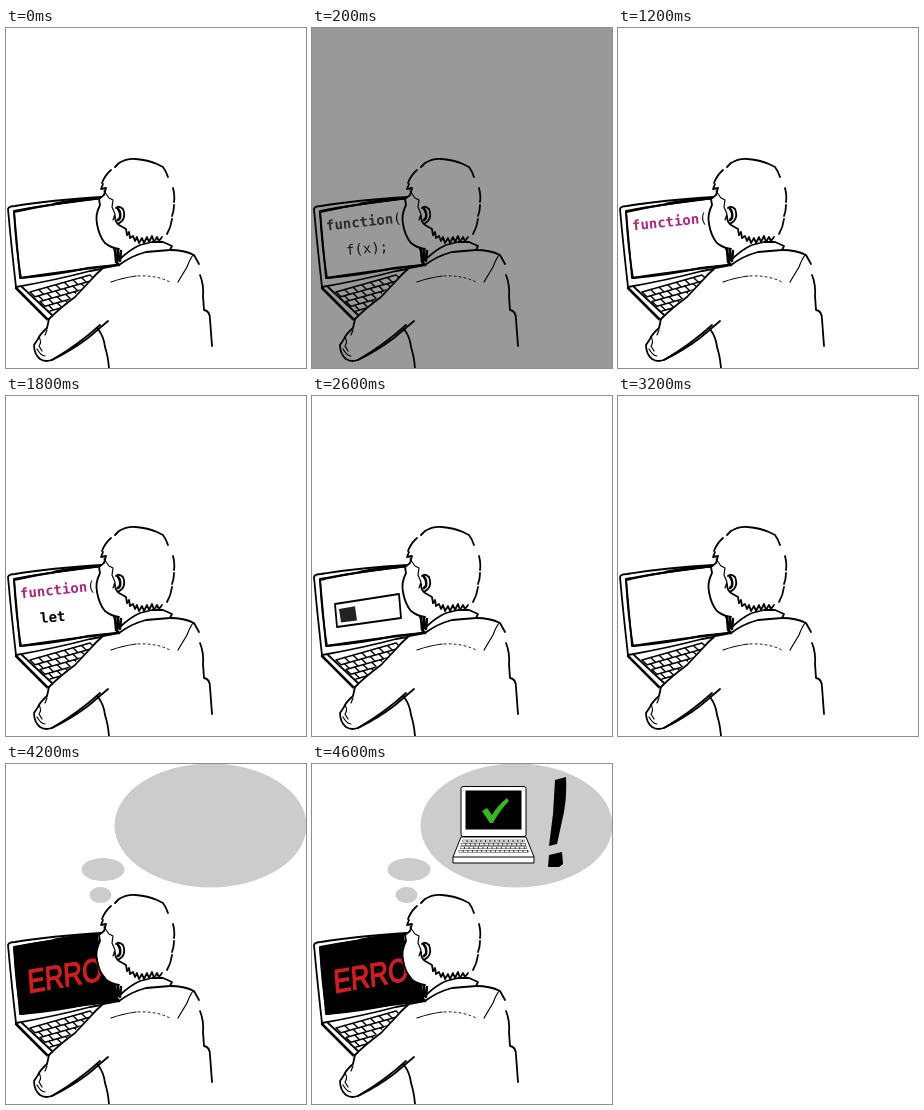
Recreate the animation shown at these times as an HTML page. Size 300 px wide and 340 px high, loop 4.8 s.

```html
<!DOCTYPE html>
<html lang="en">
<head>
<meta charset="utf-8">
<title>Coding, error, idea</title>
<style>
html, body { margin: 0; width: 100%; height: 100%; overflow: hidden; background: #fff; }
svg { display: block; width: 300px; height: 340px; background: #fff; }
.dim { filter: grayscale(1) brightness(.6); }
.ink { fill: none; stroke: #000; stroke-width: 1.8; stroke-linecap: round; stroke-linejoin: round; }
.thin { stroke-width: 1.2; }
.bold { stroke-width: 2.5; }
.code { font: 14px "DejaVu Sans Mono", monospace; fill: #222; white-space: pre; }
.kw { font-weight: bold; fill: #000; }
.fn { font-weight: bold; fill: #a8287f; }
.var { fill: #2020e0; }
.error { font: 30px "Liberation Sans", Arial, sans-serif; fill: #cc1f24; stroke: #cc1f24; stroke-width: 1.3; }
</style>
</head>
<body>
<svg id="stage" viewBox="0 0 300 340">
  <g id="laptop" class="ink">
    <path id="screen" d="M8 183Q45 176 96 170L112 237Q60 243 14 250Z" fill="#fff"/>
    <path d="M10 259Q5 215 2 181Q3 178 9 178Q45 172 96 169"/>
    <path d="M8 184Q30 179 50 176L96 170"/>
    <path d="M48 176Q65 172 94 170" class="bold"/>
    <path d="M8 184Q10 220 15 250Q50 247 82 240L110 237"/>
    <path d="M10 259Q50 252 84 243L112 238"/>
    <path d="M10 260L42 292" class="bold"/>
    <path d="M16 259L46 287"/>
    <g id="keys" stroke-width="1.4"></g>
  </g>
  <g id="code" class="code">
    <text transform="translate(14.5 202.5) rotate(-6)"><tspan class="fn">function</tspan>(</text>
    <text id="line" transform="translate(34.5 227) rotate(-5)"></text>
  </g>
  <g id="progress">
    <path class="ink" d="M23 208L87 198L89 222L25 231Z"/>
    <path id="bar" fill="#222"/>
  </g>
  <text id="error" class="error" transform="matrix(.86 -.15 .08 1.08 22.5 229)">ERRO</text>

  <g id="man">
    <path fill="#fff" d="M97 156L110 137Q130 127 152 136Q168 145 168 165Q168 190 163 204L156 214L165 222L187 226L195 247L199 283L206 318V340H103L95 303L48 332L36 334L28 322L42 291L84 253L97 240L113 237L112 221L103 218L94 206L90 190L93 178L92 172L98 167Z"/>
    <g class="ink">
      <path d="M96 155Q99 147 105 142M109 139L113 135Q121 130 130 131Q142 132 151 136L157 139Q160 143 162 149M167 160Q169 168 168 174M168 177Q168 183 166 188M166 191Q165 199 161 206"/>
      <path d="M97 156L95 161L100 160L98 167L93 171L94 177Q89 187 91 196Q93 208 99 215Q105 220 113 221"/>
      <path d="M98 163L103 170L107 172L106 179L109 186L107 192" class="thin"/>
      <path d="M110 180Q113 177 117 181Q120 188 116 193L112 196M109 188Q109 194 113 197L120 201L121 207"/>
      <path d="M112 181Q115 184 114 190L112 192" class="bold"/>
      <path d="M121 207L123 204L124 210L127 208L129 213L131 209L133 215L136 210L138 215L141 209L143 214L146 208L148 214L151 209L153 213L156 209"/>
      <path d="M109 221L110 234L113 237M112 222L112 232M115 223L114 233" class="bold"/>
      <path d="M115 230Q125 221 134 217L146 214L157 214L166 218L164 222M113 237Q125 228 140 224L164 222"/>
      <path d="M164 222Q178 222 188 227L193 236M194 247Q198 257 197 268L198 282Q204 283 204 291L206 318"/>
      <path d="M187 227Q184 231 181 239L172 254" class="thin"/>
      <path d="M105 254Q116 250 130 248" class="thin"/>
      <path d="M132 248Q150 247 164 254" stroke-width=".9" stroke-dasharray="2 3"/>
      <path d="M113 237L97 240Q90 246 84 253L69 269Q54 280 43 291"/>
      <path d="M43 291L41 300Q34 306 32 311L28 317Q28 326 34 331Q40 335 48 331Q66 322 82 310L102 293"/>
      <path d="M33 309Q36 314 33 318L36 323M31 321Q35 328 39 328M41 302L39 307" class="thin"/>
      <path d="M46 332Q72 317 94 297M92 301Q98 309 99 319Q102 328 103 340"/>
    </g>
  </g>

  <g fill="#ccc">
    <ellipse id="puff1" cx="94.5" cy="131" rx="11" ry="8"/>
    <ellipse id="puff2" cx="97" cy="105.5" rx="21.5" ry="11.5"/>
    <ellipse id="cloud" cx="204.5" cy="61.5" rx="96" ry="62"/>
  </g>
  <g id="idea" stroke-linejoin="round">
    <rect x="149" y="22.5" width="65" height="50" rx="2" fill="#fff" stroke="#000"/>
    <rect x="153.5" y="26.5" width="56" height="39"/>
    <path d="M149 73H214L222 93V99H141V93Z" fill="#fff" stroke="#000"/>
    <path d="M141 93H222" stroke="#000"/>
    <g id="miniKeys" stroke="#333" stroke-width=".8"></g>
    <path d="M170 47L175 44L180 51Q186 41 195 34L197 37Q188 46 181 59H178Z" fill="#3ab522"/>
  </g>
  <path id="bang" d="M243 16L254 13Q255 31 252 48L245 80L237 82L241 50ZM237 91L250 88L251 100L247 103L236 103Z"/>
</svg>
<script>
const STEP = 200, LOOP = 4800;
const $ = id => document.getElementById(id);
const span = (cls, text) => `<tspan class="${cls}">${text}</tspan>`;
const x = span('var', 'x'), word = span('kw', 'let');

// second line of code, one entry per step from step 1
const lines = [`f(${x});`, `f(${x})`, `f(${x}`, 'f(', 'f', '', 'l', 'le',
  word, `${word} ${x}`, `${word} ${x} =`];
const fills = [34, 44, 67, 80];   // progress bar ends from step 12

// point on the keyboard, u along a row, v toward the user
const key = (u, v) => `${24 + 60 * u + 20 * v} ${264 - 17 * u + 19 * v}`;
let grid = '';
for (let i = 0; i <= 4; i++) grid += `M${key(0, i / 4)}L${key(1, i / 4)}`;
for (let row = 0; row < 4; row++)
  for (let i = 0; i <= 7; i++) {
    const u = Math.min(1, (i + (row % 2) * .4) / 7);
    grid += `M${key(u, row / 4)}L${key(u, (row + 1) / 4)}`;
  }
$('keys').innerHTML = `<path d="${grid}"/>`;

let mini = '';
for (let r = 0; r < 4; r++) {
  const y = 77 + 3.4 * r, half = 31 + 1.3 * r;
  mini += `<path d="M${181.5 - half} ${y}H${181.5 + half}" stroke-width="2.6"/>` +
    `<path d="M${182 - half} ${y}H${181 + half}" stroke="#fff" stroke-width="1.6" stroke-dasharray="3.6 1"/>`;
}
$('miniKeys').innerHTML = mini;

const show = (id, on) => $(id).style.display = on ? '' : 'none';
let last = -1;

function draw() {
  const step = Math.floor(performance.now() % LOOP / STEP);
  if (step !== last) {
    last = step;
    $('stage').classList.toggle('dim', step === 1);
    show('code', step >= 1 && step <= 11);
    $('line').innerHTML = lines[step - 1] || '';
    const loading = step >= 12 && step <= 15;
    show('progress', loading);
    if (loading) {
      const end = fills[step - 12], top = 218.5 - .19 * end, low = 230 - .125 * end;
      $('bar').setAttribute('d', `M27 213L${end - 1} ${top}L${end + 1} ${low}L29 226.5Z`);
    }
    $('screen').setAttribute('fill', step >= 17 ? '#000' : '#fff');
    show('error', step >= 18);
    show('puff1', step >= 19);
    show('puff2', step >= 20);
    show('cloud', step >= 21);
    show('idea', step >= 22);
    show('bang', step >= 23);
  }
  requestAnimationFrame(draw);
}
draw();
</script>
</body>
</html>
```
